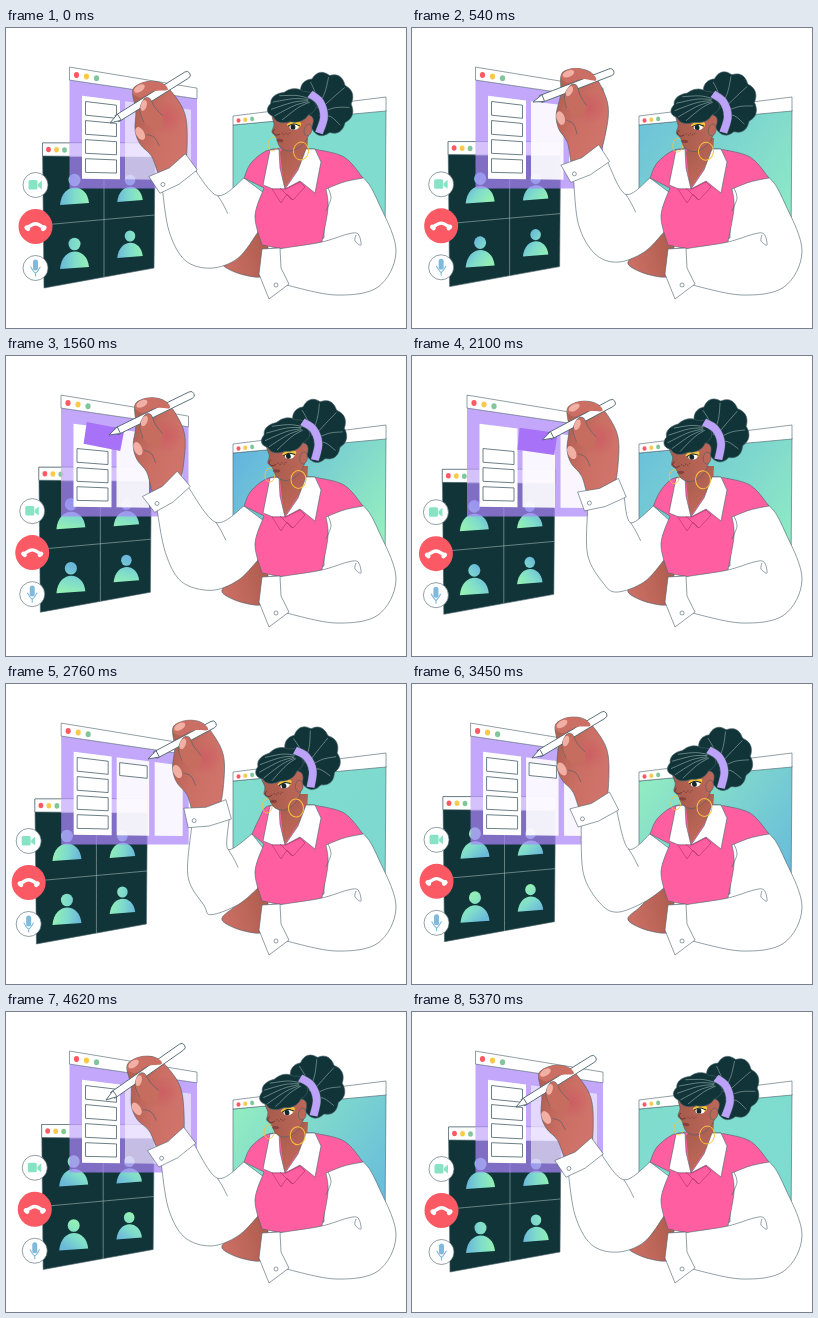
These frames come from a looping animation (400x300 px, 5400 ms). An HTML page with a canvas:

```html
<!DOCTYPE html>
<html lang="en">
<head>
<meta charset="utf-8">
<title>Video call planning board</title>
<style>
html, body { margin: 0; width: 100%; height: 100%; overflow: hidden; background: #fff; }
canvas { display: block; width: 400px; height: 300px; }
</style>
</head>
<body>
<canvas id="stage"></canvas>
<script>
const LOOP = 5400, TAU = 2 * Math.PI, DEG = Math.PI / 180;
const INK = '#48606a', DARK = '#103437', PINK = '#ff5fa0', WHITE = '#fff';
const SKIN = '#cb6e64', SHADE = '#a85c4d', NAIL = '#f2b0a5', GOLD = '#f8c33c';
const PICK = 1200, DROP = 2150;

// Gesture: time, pen tip x and y, hand angle, head angle
const KEYS = [
  [0, 104, 95, -1, 0],
  [540, 121, 74, 10, -2],
  [PICK, 97, 80, 5, -4],
  [1560, 103, 79, 5, -5],
  [DROP, 131, 84, 3, -8],
  [2760, 142, 75, 3, -10],
  [3450, 120, 74, 0, -5],
  [4620, 100, 88, -4, -6.5],
  [5250, 104, 95, -1, 0]
];

const canvas = document.getElementById('stage');
const c = canvas.getContext('2d');
const ratio = window.devicePixelRatio || 1;
canvas.width = 400 * ratio;
canvas.height = 300 * ratio;
let now = 0;

function ease(from, to) {
  const u = Math.min(1, Math.max(0, (now - from) / (to - from)));
  return u * u * (3 - 2 * u);
}

function gesture() {
  const i = KEYS.findLastIndex(k => k[0] <= now);
  const a = KEYS[i], b = KEYS[(i + 1) % KEYS.length];
  const u = ease(a[0], b[0] || LOOP);
  const [, x, y, hand, head] = a.map((v, j) => v + (b[j] - v) * u);
  return { x, y, hand: hand * DEG, head };
}

function paint(fill, stroke, width = 0.6) {
  if (fill) { c.fillStyle = fill; c.fill(); }
  if (stroke) { c.strokeStyle = stroke; c.lineWidth = width; c.stroke(); }
}

function poly(pts, fill, stroke, width) {
  c.beginPath();
  pts.forEach(p => c.lineTo(...p));
  c.closePath();
  paint(fill, stroke, width);
}

// Smooth curve through points
function trace(pts, closed) {
  const n = pts.length;
  const p = i => closed ? pts[(i + n) % n] : pts[Math.max(0, Math.min(n - 1, i))];
  c.lineTo(...pts[0]);
  for (let i = 0; i < (closed ? n : n - 1); i++) {
    const [a, b, d, e] = [p(i - 1), p(i), p(i + 1), p(i + 2)];
    c.bezierCurveTo(b[0] + (d[0] - a[0]) / 6, b[1] + (d[1] - a[1]) / 6,
      d[0] - (e[0] - b[0]) / 6, d[1] - (e[1] - b[1]) / 6, ...d);
  }
}

function line(pts, color = INK, width = 0.6) {
  c.beginPath();
  trace(pts);
  paint(null, color, width);
}

function blob(pts, fill, stroke, width) {
  c.beginPath();
  trace(pts, true);
  c.closePath();
  paint(fill, stroke, width);
}

// Several smooth sides joined by corners
function panel(sides, fill, stroke) {
  c.beginPath();
  sides.forEach(s => trace(s));
  c.closePath();
  paint(fill, stroke);
}

function oval(x, y, rx, ry, fill, stroke, turn = 0, width) {
  c.beginPath();
  c.ellipse(x, y, rx, ry, turn, 0, TAU);
  paint(fill, stroke, width);
}

function gradient(x0, y0, x1, y1, ...stops) {
  const g = c.createLinearGradient(x0, y0, x1, y1);
  stops.forEach((s, i) => g.addColorStop(i / (stops.length - 1), s));
  return g;
}

function lights(x, y, dx, dy, r) {
  ['#fb5a62', '#fbc94a', '#7fc79a'].forEach((col, i) => oval(x + dx * i, y + dy * i, r, r * 1.15, col));
}

function group(x, y, turn, draw) {
  c.save();
  c.translate(x, y);
  c.rotate(turn);
  draw();
  c.restore();
}

function backWindow(phase) {
  const s = Math.sin(phase);
  const tint = k => {
    const end = k > 0 ? [98, 180, 222] : [150, 240, 190];
    return `rgb(${[127, 220, 207].map((v, i) => Math.round(v + (end[i] - v) * Math.abs(k)))})`;
  };
  poly([[227, 97], [380, 82], [379, 215], [227, 218]],
    gradient(235, 95, 370, 190, tint(s), tint(-s)), INK);
  poly([[227, 88], [380, 69], [380, 83], [227, 97]], WHITE, INK);
  lights(232.5, 92.5, 6.8, -0.8, 2);
}

function caller(x, y, size, phase) {
  const dx = Math.cos(phase) * 13, dy = Math.sin(phase) * 13;
  const g = gradient(x - dx, y + 12 - dy, x + dx, y + 12 + dy, '#6bb9da', '#7fdccb', '#93efb5');
  const w = 14.5 * size, base = y + 25 * size;
  oval(x, y, 6 * size, 6.3 * size, g);
  c.beginPath();
  c.moveTo(x - w, base);
  c.bezierCurveTo(x - w + 2, y + 2, x + w - 2, y + 2, x + w, base - 2);
  c.closePath();
  paint(g);
}

function callWindow(phase) {
  poly([[36.5, 115], [149, 115], [148, 240], [38, 260]], DARK, INK);
  poly([[36.5, 115], [149, 115], [149, 129], [36.5, 128]], WHITE, INK);
  lights(42.5, 121.5, 8, 0.2, 2.4);
  line([[98, 129], [98, 249]], '#9fb9b8');
  line([[37, 197], [148.5, 187]], '#9fb9b8');
  for (const y of [152, 216]) {
    caller(68.5, y, 1, phase);
    caller(124, y - (y - 152) / 8, 0.88, phase);
  }
}

function callButtons() {
  for (const y of [157, 240]) oval(29.5, y, 12.5, 12.5, WHITE, INK);
  c.beginPath();
  c.roundRect(22.5, 152, 9, 9.5, 1.5);
  paint('#86e4c4');
  poly([[32, 156], [36, 152.5], [36, 161.5], [32, 158.5]], '#86e4c4');

  oval(29.5, 198.5, 17, 17.5, '#fb5a64');
  c.lineCap = 'round';
  line([[20.5, 200], [29.5, 195.8], [38.5, 200]], WHITE, 3.4);
  line([[20.5, 199.5], [22, 201]], WHITE, 4.2);
  line([[37, 201], [38.5, 199.5]], WHITE, 4.2);

  c.beginPath();
  c.roundRect(27, 231.5, 5, 11, 2.5);
  paint('#7fb9dc');
  line([[24.8, 239], [29.5, 245], [34.2, 239]], '#7fb9dc', 1.1);
  line([[29.5, 245], [29.5, 248]], '#7fb9dc', 1.1);
  c.lineCap = 'butt';
}

// Board perspective: y is measured at the left edge
const tilt = (x, y) => [x, y + (x - 63) * 0.165 * (160 - y) / 121];
const slab = (x, y, w, h) => [tilt(x, y), tilt(x + w, y), tilt(x + w, y + h), tilt(x, y + h)];

function board(callX, callY) {
  poly(slab(63.5, 52, 127.5, 108.5), 'rgba(171,133,250,.72)');
  c.fillStyle = 'rgba(255,255,255,.3)';
  c.fillRect(63.5, 115 + callY, 85.5 + callX, 14);
  poly(slab(63.5, 39, 127.5, 13), WHITE, INK);
  lights(70.5, 47, 10, 1.6, 2.6);

  poly(slab(76, 66, 38, 84.5), WHITE);
  c.globalAlpha = 0.55 + 0.35 * (ease(0, 500) - ease(3700, 4600));
  poly(slab(119, 66, 32.5, 84.5), WHITE);
  poly(slab(157, 66, 28, 84.5), WHITE);

  const card = (x, row, w, alpha) => {
    c.globalAlpha = alpha;
    poly(slab(x, 71.5 + 19.5 * row, w, 14), WHITE, INK, 0.8);
  };
  for (let row = 1; row < 4; row++) card(79.5, row, 31, 1);
  card(79.5, 0, 31, now < PICK ? 1 : ease(DROP, DROP + 300));
  card(122, 0, 27.5, now < DROP ? 0 : 1 - ease(3700, 4300));
  c.globalAlpha = 1;
}

function note(tip) {
  if (now < PICK || now > DROP) return;
  const turn = 0.06 * Math.sin((now - PICK) / (DROP - PICK) * Math.PI);
  group(tip.x - 5, tip.y + 2, turn, () =>
    poly([[-18, -14], [20, -9], [17, 13], [-20, 8]], '#a872f8'));
}

function pen(len) {
  group(0, 0, -31 * DEG, () => {
    c.beginPath();
    c.roundRect(8, -3.6, len - 8, 7.2, [0, 4, 4, 0]);
    paint(WHITE, INK, 0.8);
    poly([[0, 0], [11, -3.6], [11, 3.6]], WHITE, INK, 0.8);
  });
}

function hand(len) {
  const skin = gradient(25, -10, 78, 5, '#b26152', SKIN, '#d0746b');
  blob([[23, -31], [29, -38], [41, -41], [54, -38], [66, -25], [75, -8], [77, 14], [74, 44],
    [62, 56], [50, 56], [41, 34], [30, 22], [25, 8], [26, -12]], skin, INK);
  const blush = c.createRadialGradient(57, -4, 0, 57, -4, 17);
  blush.addColorStop(0, 'rgba(205,70,95,.4)');
  blush.addColorStop(1, 'rgba(205,70,95,0)');
  oval(57, -4, 17, 17, blush);
  oval(30, 11, 4, 7, NAIL, null, -0.5);
  pen(len);

  // Fingers in front of the pen
  blob([[23, -30], [29, -38], [41, -41], [54, -38], [58, -32], [44, -31], [31, -25]], SKIN);
  oval(30, -34, 6, 3.3, NAIL, null, -0.55);
  const thumb = [[34, 0], [30, -12], [34, -23], [40, -24], [45, -15], [53, -6]];
  blob([...thumb, [50, 8]], '#c66d60');
  line(thumb);
  oval(34, -17, 3, 5.5, NAIL, null, 0.3);
  line([[36, 12], [44, 15], [49, 24]]);
}

function drawingArm(tip) {
  const cos = Math.cos(tip.hand), sin = Math.sin(tip.hand);
  const cx = tip.x + 62 * cos - 52 * sin, cy = tip.y + 62 * sin + 52 * cos;
  const turn = (0.6 * (cx - 173) - 27) * DEG;
  const cuff = (x, y) => [
    cx + x * Math.cos(turn) - y * Math.sin(turn),
    cy + x * Math.sin(turn) + y * Math.cos(turn)
  ];
  group(tip.x, tip.y, tip.hand, () => hand(94 - 0.45 * (tip.x - 104)));

  // The elbow follows the wrist at a lower rate
  const side = [167 + 0.55 * (cx - 174), 195 + 0.7 * (cy - 134)];
  const low = [side[0] + 16, side[1] + 29];
  const elbow = [205, 233 + 0.6 * (cy - 134)];
  const bend = [214 + 0.3 * (cx - 174), 166 + 0.15 * (cy - 134)];
  const shoulder = [shoulderX(tip), 150];
  panel([
    [cuff(-17, 8), side, low, elbow, [232, elbow[1] - 10], [252, 204]],
    [[258, 165], shoulder],
    [shoulder, bend, cuff(21, 8)]
  ], WHITE, INK);
  line([bend, [bend[0] + 5, bend[1] + 8], [bend[0] + 10, bend[1] + 18]]);

  poly([cuff(-22, -10), cuff(0, -7), cuff(21, -11), cuff(23, 9), cuff(0, 12), cuff(-21, 10)], WHITE, INK);
  oval(...cuff(-14, 4), 2, 2, WHITE, INK);
}

const shoulderX = tip => 238 + 0.4 * Math.max(0, tip.x - 122);

function restingHand() {
  blob([[216, 236], [228, 223], [248, 205], [261, 214], [260, 246], [238, 247]],
    gradient(220, 235, 260, 225, SKIN, '#b05e50'), INK);
}

function torso(tip) {
  panel([
    [[318, 155], [354, 148], [375, 180], [390, 224], [372, 259], [330, 267], [280, 257]],
    [[258, 222], [318, 210]]
  ], WHITE, INK);

  const sx = shoulderX(tip);
  panel([
    [[sx, 150], [sx + 7, 135], [260, 123], [275, 120]],
    [[308, 121], [338, 129], [357, 150]],
    [[357, 150], [338, 154], [320, 161]],
    [[320, 161], [322, 180], [316, 214]],
    [[316, 214], [285, 221], [256, 217]],
    [[256, 217], [249, 188], [258, 160]],
    [[258, 160], [sx, 150]]
  ], PINK, INK);

  // Forearm, fold and cuff
  const fore = [[258, 223], [285, 219], [316, 214], [342, 206]];
  panel([fore, [[345, 240], [278, 252]]], WHITE);
  line([...fore, [352, 206], [355, 217], [349, 213], [350, 207]]);
  line([[320, 183], [325, 170], [322, 160]]);
  poly([[256, 221], [274, 220], [275, 240], [283, 256], [263, 271], [253, 246]], WHITE, INK);
  oval(270, 257, 2, 2, WHITE, INK);
}

function neckline() {
  poly([[274, 124], [284, 110], [302, 110], [301, 127], [278, 161]],
    gradient(278, 118, 298, 140, SHADE, '#bd6759'));
  poly([[273, 121], [264, 122], [257, 157], [267, 161], [279, 161], [274, 140]], WHITE, INK);
  poly([[300, 121], [309, 121], [315, 134], [309, 165], [294, 153], [279, 161], [292, 142]], WHITE, INK);
  const seam = '#a92f68';
  poly([[266, 161], [280, 161], [294, 154], [299, 159], [287, 172], [281, 166], [275, 175]], PINK, seam);
  line([[274, 160], [286, 172]], seam);
}

// Curly lump of hair with strands fanning out of a hub
function curls(x, y, rx, ry, lobes, turn, hub, from, to) {
  group(x, y, turn, () => {
    c.beginPath();
    for (let i = 0; i <= 120; i++) {
      const a = i / 120 * TAU, r = 0.9 + 0.1 * Math.abs(Math.sin(a * lobes / 2));
      c.lineTo(Math.cos(a) * rx * r, Math.sin(a) * ry * r);
    }
    paint(DARK, INK);
    for (let i = 0; i < 5; i++) {
      const a = from + (to - from) * i / 4;
      const end = [Math.cos(a) * rx * 0.85, Math.sin(a) * ry * 0.85];
      line([[hub[0] + end[0] * 0.15, hub[1] + end[1] * 0.15],
        [(hub[0] + end[0]) / 2 + 2, (hub[1] + end[1]) / 2 - 2], end], '#aec4c3', 0.5);
    }
  });
}

function face() {
  oval(267, 116, 5, 7, null, GOLD, 0.2, 0.8);
  blob([[269, 84], [268, 97], [266, 104], [270, 109], [274, 119], [284, 123],
    [296, 117], [303, 106], [305, 88]], gradient(268, 100, 306, 104, SHADE, '#bd6759'), INK);
  oval(302, 102, 3.8, 6, '#bd6759', INK, 0.25);
  blob([[281, 97], [288, 93], [295, 95], [292, 100]], GOLD);
  oval(288, 99, 4.5, 2.6, WHITE);
  oval(287, 99, 2.4, 2.6, '#14272b');
  line([[282, 98], [288, 96], [294, 98]], '#14272b', 1);
  line([[269, 101], [267, 104], [270, 107], [274, 106]], '#56221f', 0.7);
  oval(274, 112.5, 3.4, 1.6, '#87403c', null, 0.15);
  for (let i = 0; i < 5; i++) oval(276 + 2 * i, 105 + 1.3 * (i % 2), 0.6, 0.6, '#713a32');
}

function head(angle) {
  group(300 + 0.3 * angle, 135, angle * DEG, () => {
    c.translate(-300, -135);
    curls(319, 76, 29, 32, 9, 0, [-8, 8], -2.2, 0.9);
    face();
    curls(286, 78, 25, 17, 7, -0.2, [20, -2], 2.2, 4.2);
    const band = [[304, 66], [314, 74], [318, 89], [313, 105]];
    line(band, INK, 8.6);
    line(band, '#bda2fa', 7.6);
    oval(295, 123, 7.5, 9, null, GOLD, 0.1, 1);
  });
}

function draw(t) {
  now = t % LOOP;
  const phase = now / LOOP * TAU;
  const tip = gesture();
  c.setTransform(ratio, 0, 0, ratio, 0, 0);
  c.fillStyle = WHITE;
  c.fillRect(0, 0, 400, 300);
  c.lineJoin = 'round';

  const callX = 3.8 * (Math.cos(phase - 0.3 * Math.sin(phase)) - 1);
  const callY = 2 * (Math.cos(2 * phase) - 1);
  const boardX = 8.5 * (ease(2600, 4500) - ease(700, 1500));

  backWindow(phase);
  group(callX, callY, 0, () => callWindow(phase));
  group(boardX, 0, 0, () => board(callX - boardX, callY));
  group(0.9 * callX, callY / 2, 0, callButtons);
  note(tip);
  restingHand();
  drawingArm(tip);
  torso(tip);
  neckline();
  head(tip.head);
}

const start = performance.now();
function tick() {
  draw(performance.now() - start);
  requestAnimationFrame(tick);
}
tick();
</script>
</body>
</html>
```
